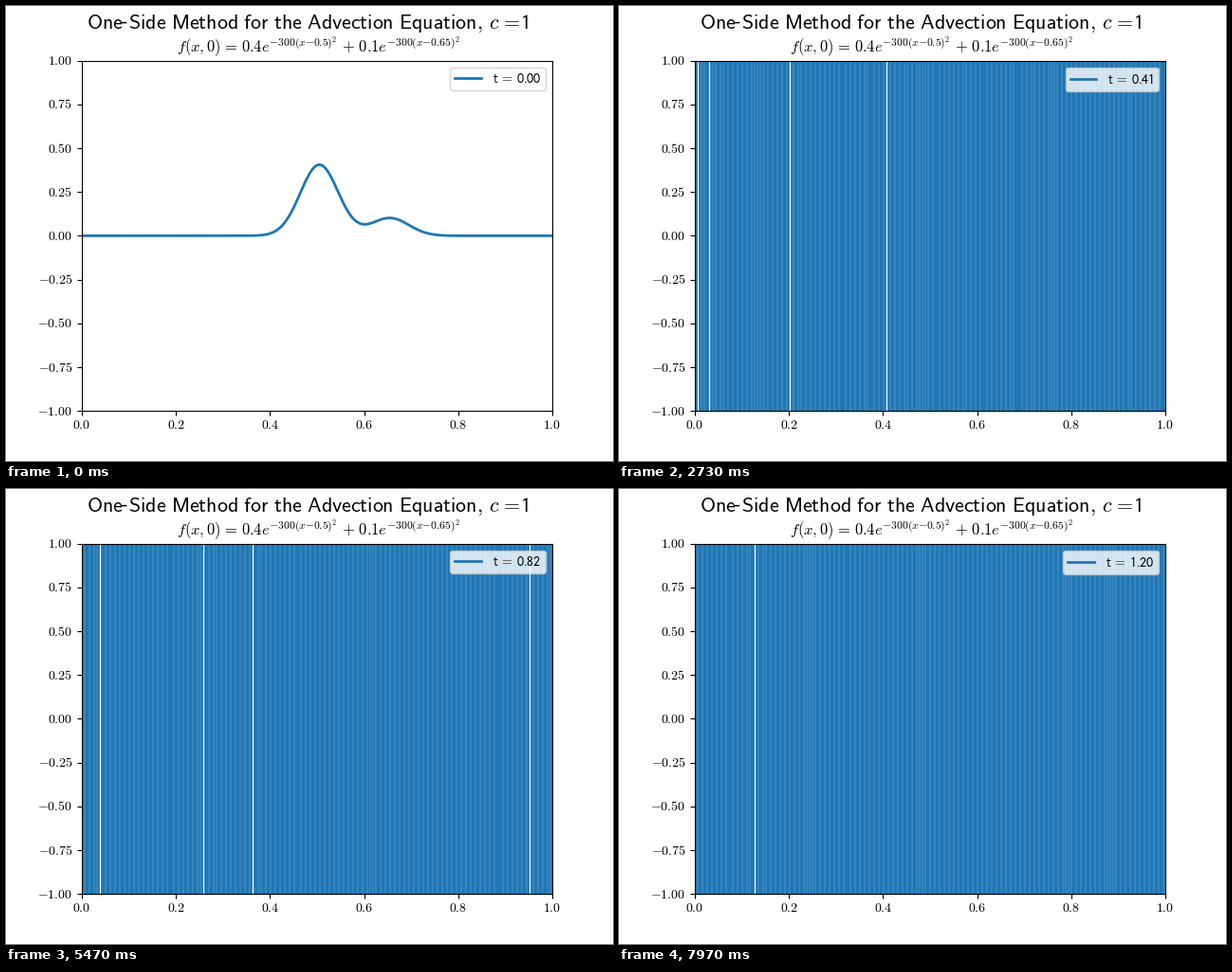
Recreate the animation shown at these times as a matplotlib script. Size 640 px wide and 480 px high, loop 8.01 s.

```python
import numpy as np
import matplotlib.pyplot as plt
from matplotlib.animation import FuncAnimation
from matplotlib.transforms import ScaledTranslation

W, H = 640, 480
FRAMES, FRAME_MS = 267, 30
STEPS, STEP_MS = 240, 100 / 3
C, DX, DT = 1, 0.005, 0.005

plt.rcParams.update({
    "font.family": "Liberation Sans",
    "mathtext.fontset": "cm",
})

# The "cm" set draws plain digits with serifs; these are the sans ones.
SANS_DIGITS = {ord("0") + d: chr(0x1D7E2 + d) for d in range(10)}


def sans(words):
    """Computer Modern sans words as mathtext."""
    return r"\ ".join(r"\mathsf{%s}" % w for w in words.split())


def sans_number(text):
    return r"\mathrm{%s}" % text.translate(SANS_DIGITS)


def time_label(n):
    equals = r"\hspace{0.18}=\hspace{0.18}"
    return "$" + sans("t") + equals + sans_number(f"{n * DT:.2f}") + "$"


def solve(u):
    """Forward-difference advection on a periodic grid (unstable for c > 0)."""
    r = C * DT / DX
    states = []
    for _ in range(STEPS):
        u = u - r * (np.roll(u, -1) - u)
        states.append(u)
    return states


x = np.linspace(0, 1, 201)
start = 0.4 * np.exp(-300 * (x - 0.5) ** 2) + 0.1 * np.exp(-300 * (x - 0.65) ** 2)
states = solve(start)

fig, ax = plt.subplots(figsize=(W / 100, H / 100), dpi=100)
line, = ax.plot(x, states[0], lw=2, color="#1f77b4", label=time_label(0))
ax.set_xlim(0, 1)
ax.set_ylim(-1, 1)
ax.set_xticks(np.linspace(0, 1, 6))
ax.set_yticks(np.linspace(-1, 1, 9))
ax.xaxis.set_major_formatter(lambda v, _: f"${v:.1f}$")
ax.yaxis.set_major_formatter(lambda v, _: f"${v:.2f}$")
ax.tick_params(axis="x", pad=2.4)
lift = ScaledTranslation(0, 0.6 / 72, fig.dpi_scale_trans)
for tick in ax.get_yticklabels():
    tick.set_transform(tick.get_transform() + lift)

legend = ax.legend(loc="best", borderpad=0.36, handletextpad=0.84)
label = legend.get_texts()[0]

# Mathtext turns "-" into a minus sign, so the hyphen is placed on its own.
heading = ("$" + sans("One") + r"\hspace{0.379}"
           + sans("Side Method for the Advection Equation,")
           + r"\hspace{0.18}c\hspace{0.11}=\!" + sans_number("1") + "$")
base = 1 - 24 / H
fig.text(0.497, base, heading, fontsize=15.75, ha="center", va="baseline")
fig.text(124.5 / W, base, "-", fontsize=15.75, ha="center", va="baseline")

pad = r"\hspace{0.116}"
ax.set_title(f"$f(x,0){pad}={pad}" + r"0.4e^{-300(x{-}0.5)^2}"
             + f"{pad}+{pad}" + r"0.1e^{-300(x{-}0.65)^2}$",
             fontsize=11.9, x=0.503)


def update(i):
    # Show the solver step that is current near the end of this frame.
    n = min(int((i * FRAME_MS + 25) / STEP_MS), STEPS - 1)
    line.set_ydata(states[n])
    label.set_text(time_label(n))
    return line, legend


anim = FuncAnimation(fig, update, frames=FRAMES, interval=FRAME_MS,
                     repeat=True, repeat_delay=0, blit=False)
plt.show()
```
